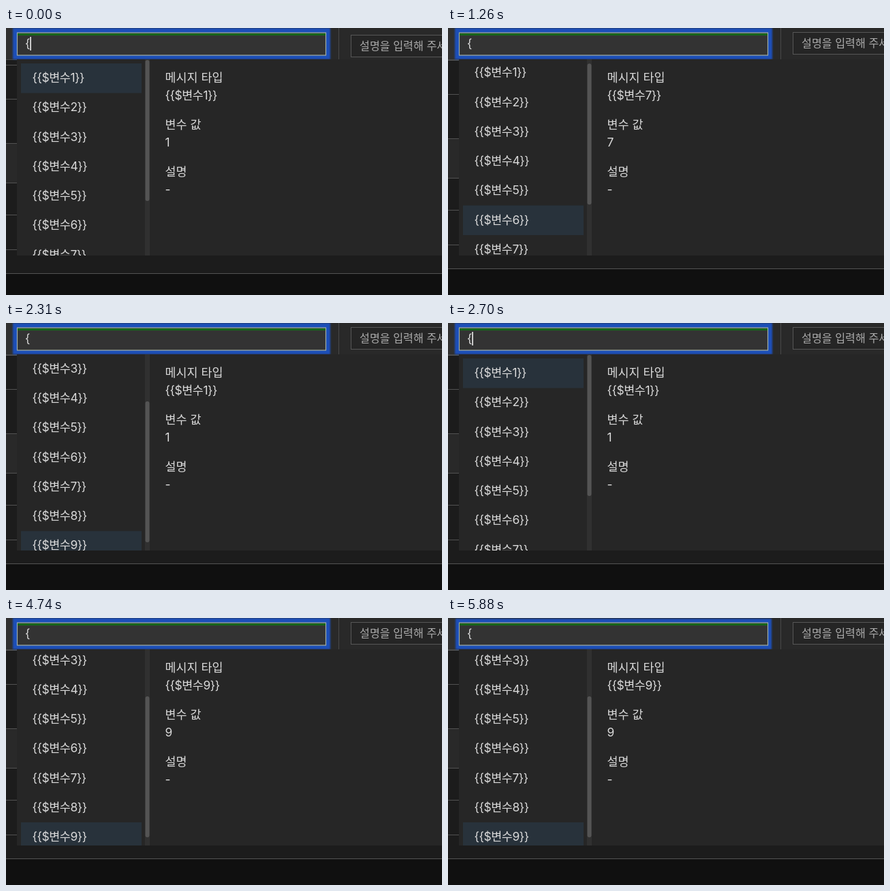
These frames come from a looping animation (640 px wide and 392 px high, 5.91 s). An HTML page:

```html
<!DOCTYPE html>
<html lang="ko">
<head>
<meta charset="utf-8">
<style>
html, body { margin: 0; width: 100%; height: 100%; overflow: hidden; background: #1c1c1c; }
svg { display: block; width: 100vw; height: 100vh; }
text { font: 17.4px Inter, "Noto Sans CJK KR", "Noto Sans CJK", sans-serif; fill: #dadada; white-space: pre; }
.tag { letter-spacing: -.42px; }
</style>
</head>
<body>
<svg id="stage" viewBox="0 0 640 392">
  <defs>
    <clipPath id="view"><rect x="16" y="46" width="188" height="288"/></clipPath>
    <filter id="soft" filterUnits="userSpaceOnUse" x="0" y="-10" width="500" height="70">
      <feGaussianBlur stdDeviation="1.2"/>
    </filter>
  </defs>
  <g id="page"></g>
  <rect width="640" height="46" fill="#292929"/>
  <rect width="11" height="46" fill="#303030"/>
  <path d="M0 46.5H16M488.5 0V46" stroke="#484848"/>
  <g id="field">
    <rect x="506.5" y="10.5" width="150" height="32" fill="#252525" stroke="#575757"/>
    <text x="519" y="31.5" style="font-size:16.2px;fill:#aaa">설명을 입력해 주세요</text>
  </g>
  <rect id="ring" fill="#1c4fb8" filter="url(#soft)"/>
  <rect x="16.5" y="7" width="453" height="33" fill="#333" stroke="#a3b0a5" stroke-width="1.2"/>
  <path d="M17 9.5H469" stroke="#17651a" stroke-width="3"/>
  <text x="28" y="29">{</text>
  <rect id="caret" x="35.3" y="13" width="1.6" height="20" fill="#eee"/>
  <rect x="16" y="46" width="624" height="288" fill="#262626"/>
  <g clip-path="url(#view)"><g id="list"></g></g>
  <rect x="204" y="46" width="7" height="288" fill="#303030"/>
  <rect id="thumb" x="204.5" width="6" height="207" rx="3" fill="#545454"/>
  <g id="detail"></g>
</svg>
<script>
const LOOP = 5910, STEP = 30, ROW = 43.25;
const $ = id => document.getElementById(id);

function add(parent, tag, attrs, text = "") {
  const el = document.createElementNS("http://www.w3.org/2000/svg", tag);
  for (const key in attrs) el.setAttribute(key, attrs[key]);
  el.textContent = text;
  return parent.appendChild(el);
}

const set = (el, attrs) => { for (const key in attrs) el.setAttribute(key, attrs[key]); };
const label = n => `{{$변수${n}}}`;
const clamp = u => Math.min(1, Math.max(0, u));
const smooth = u => u * u * (3 - 2 * u);

// Page rows behind the popup
add($("page"), "rect", { y: 169, width: 16, height: 58, fill: "#292929" });
for (const y of [54, 104, 169, 227, 274, 325])
  add($("page"), "path", { d: `M0 ${y + .5}H16`, stroke: "#525252" });
add($("page"), "rect", { y: 361, width: 640, height: 50, fill: "#101010" });
add($("page"), "path", { d: "M0 360.5H640", stroke: "#535353" });

const mark = add($("list"), "rect", { x: 22, width: 177, height: 43.5, fill: "#28323b" });
for (let n = 1; n <= 9; n++)
  add($("list"), "text", { class: "tag", x: 38.5, y: 79 + (n - 1) * ROW }, label(n));

const line = (y, text, style = "") => add($("detail"), "text", { class: style, x: 233.5, y }, text);
line(79, "메시지 타입");
const name = line(105, "", "tag");
line(148, "변수 값");
const value = line(174, "");
line(217, "설명");
line(243, "-");

// [time, selected item]
const picks = [[0, 1], [30, 2], [270, 3], [510, 4], [780, 5], [1020, 6],
  [1260, 7], [1590, 8], [1920, 9], [2280, 1], [3720, 9]];
// [start, duration, from, to, scrollbar delay]
const moves = [[1235, 42, 0, 12, 0], [1590, 120, 12, 55, 30], [1900, 80, 55, 98, 30],
  [2280, 210, 98, 0, 30], [3570, 255, 0, 98, 0]];

const picked = t => picks.reduce((n, [at, item]) => t >= at ? item : n, 1);

function scroll(t, useDelay) {
  let pos = 0;
  for (const [start, dur, from, to, delay] of moves) {
    const u = (t - start - (useDelay ? delay : 0)) / dur;
    if (u > 0) pos = from + (to - from) * smooth(clamp(u));
  }
  return pos;
}

function draw(now) {
  let t = Math.floor((now % LOOP) / STEP) * STEP;
  const blink = Math.floor((t + 210) / 450) % 2;
  if (t > 3630 && t < 3720) t = 3630;

  const shift = smooth(clamp(t / 210));
  set($("page"), { transform: `translate(0 ${-7 * shift})` });
  set($("field"), { transform: `translate(0 ${-4 * shift})` });

  const inset = clamp((t - 5010) / 570);
  set($("ring"), { x: 10 + inset, y: inset, width: 466 - 2 * inset, height: 46 - inset });
  set($("caret"), { visibility: blink ? "hidden" : "visible" });

  const item = picked(t);
  name.textContent = label(item);
  value.textContent = item;
  set(mark, { y: 52 + (picked(t - 60) - 1) * ROW });
  set($("list"), { transform: `translate(0 ${-scroll(t, false)})` });
  set($("thumb"), { y: 47 + scroll(t, true) * .694 });
}

const begin = performance.now();
function tick() {
  draw(performance.now() - begin);
  requestAnimationFrame(tick);
}
tick();
</script>
</body>
</html>
```
